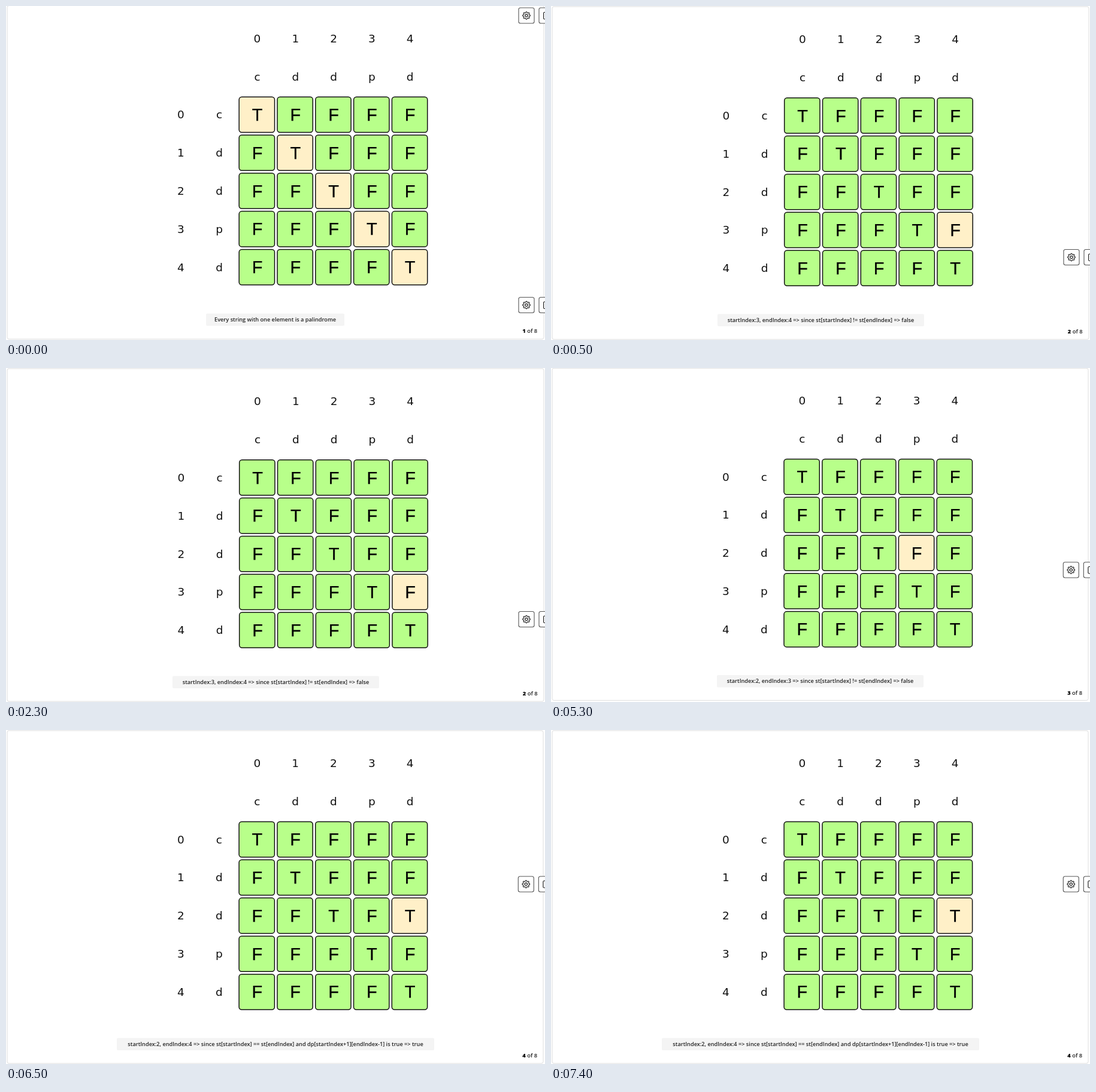
Animation, 900 px wide and 559 px high, one loop 8000 ms. Source, as an HTML page:

```html
<!DOCTYPE html>
<html lang="en">
<head>
<meta charset="utf-8">
<title>Palindrome table</title>
<style>
  html, body { margin: 0; width: 100%; height: 100%; overflow: hidden; background: #fff; }
  svg { display: block; width: 100vw; height: 100vh; }
  text { text-anchor: middle; fill: #111; }
  .label { font: 18.5px "DejaVu Sans", sans-serif; }
  .value { font: 29px "Liberation Sans", sans-serif; fill: #000; stroke: #000; stroke-width: .25; }
  .note { font: 600 9.2px "Open Sans", sans-serif; fill: #222; }
  .page { font: 600 9.4px "Open Sans", sans-serif; fill: #222; text-anchor: end; }
  .page tspan { font-weight: 800; fill: #000; }
  .card { fill: #fff; stroke: #dedede; }
  .cell { fill: #b8ff8a; stroke: #111; stroke-width: 1.5; }
  .cell.active { fill: #fff0c8; }
  .caption { fill: #f4f4f4; }
  .button { fill: #fff; stroke: #555; stroke-width: 1.1; }
  .icon { fill: none; stroke: #222; stroke-width: 1.2; }
  .step { opacity: 0; animation: 8s step-end infinite; }
  .step:nth-child(1) { animation-name: first; }
  .step:nth-child(2) { animation-name: second; }
  .step:nth-child(3) { animation-name: third; }
  .step:nth-child(4) { animation-name: fourth; }
  @keyframes first { 0% { opacity: 1 } 6.25%, 100% { opacity: 0 } }
  @keyframes second { 0% { opacity: 0 } 6.25% { opacity: 1 } 43.75%, 100% { opacity: 0 } }
  @keyframes third { 0% { opacity: 0 } 43.75% { opacity: 1 } 81.25%, 100% { opacity: 0 } }
  @keyframes fourth { 0% { opacity: 0 } 81.25%, 100% { opacity: 1 } }
</style>
</head>
<body>
<svg id="stage" viewBox="0 0 900 559" preserveAspectRatio="none"></svg>
<script>
const word = 'cddpd';
const pitch = 63.8;

const steps = [
  { dx: 0, dy: 0, card: [2, -.5, 896, 558], buttons: [[869, 16], [869, 500.5]], active: (r, c) => r === c,
    box: [334, 514.7, 231], note: 'Every string with one element is a palindrome' },
  { dx: .5, dy: 1.6, card: [2, 1, 896, 557], buttons: [[869, 420.5]], active: (r, c) => r === 3 && c === 4,
    box: [278, 515.5, 345], note: 'startIndex:3, endIndex:4 => since st[startIndex] != st[endIndex] => false' },
  { dx: -.2, dy: .2, card: [2, .3, 895, 556], buttons: [[868.3, 338]], active: (r, c) => r === 2 && c === 3,
    box: [277, 514, 345], note: 'startIndex:2, endIndex:3 => since st[startIndex] != st[endIndex] => false' },
  { dx: -.1, dy: 1.3, card: [2, 1, 895, 557], buttons: [[868.3, 258]], active: (r, c) => r === 2 && c === 4, solved: true,
    box: [185, 515.5, 530], note: 'startIndex:2, endIndex:4 => since st[startIndex] == st[endIndex] and dp[startIndex+1][endIndex-1] is true => true' }
];

const rect = (cls, x, y, w, h, r) =>
  `<rect class="${cls}" x="${x}" y="${y}" width="${w}" height="${h}" rx="${r}"/>`;
const text = (cls, x, y, s) => `<text class="${cls}" x="${x}" y="${y}">${s}</text>`;
const escape = s => s.replace(/>/g, '&gt;');

function gear(x, y) {
  const points = Array.from({ length: 96 }, (_, i) => {
    const a = i * Math.PI / 48;
    const r = 5.5 + .8 * Math.tanh(2 * Math.cos(8 * a));
    return (x + r * Math.cos(a)).toFixed(2) + ' ' + (y + r * Math.sin(a)).toFixed(2);
  });
  return `<path class="icon" d="M${points.join('L')}Z"/><circle class="icon" cx="${x}" cy="${y}" r="2.2"/>`;
}

function buttons([x, y]) {
  return rect('button', x - 13, y - 13, 26, 26, 3) + gear(x, y) +
    rect('button', x + 21, y - 13, 26, 26, 3) + rect('icon', x + 28.6, y - 5.5, 10, 11.5, 1.5);
}

function table({ active, solved }) {
  let out = '';
  for (let i = 0; i < 5; i++) {
    const x = 419.5 + i * pitch, y = 188.4 + i * pitch;
    out += text('label', x, 60.8, i) + text('label', x, 124.6, word[i]);
    out += text('label', 292, y, i) + text('label', 356, y, word[i]);
    for (let c = 0; c < 5; c++) {
      const left = 389.2 + c * pitch, top = 152.2 + i * pitch;
      const yes = i === c || (solved && i === 2 && c === 4);
      out += rect(active(i, c) ? 'cell active' : 'cell', left, top, 59.3, 59.3, 4.5);
      out += text('value', left + 30.3, top + 39.8, yes ? 'T' : 'F');
    }
  }
  return out;
}

function scene(s, i) {
  const [x, y, w] = s.box;
  return `<g class="step">${rect('card', ...s.card, 3)}` +
    `<g transform="translate(${s.dx} ${s.dy})">${table(s)}</g>` +
    rect('caption', x, y, w, 20.5, 2) + text('note', x + w / 2, y + 13.4, escape(s.note)) +
    text('page', 887.2 + s.dx, 546.6 + s.dy * .7, `<tspan>${i + 1}</tspan> of 8`) +
    s.buttons.map(buttons).join('') + '</g>';
}

document.getElementById('stage').innerHTML = steps.map(scene).join('');
</script>
</body>
</html>
```
